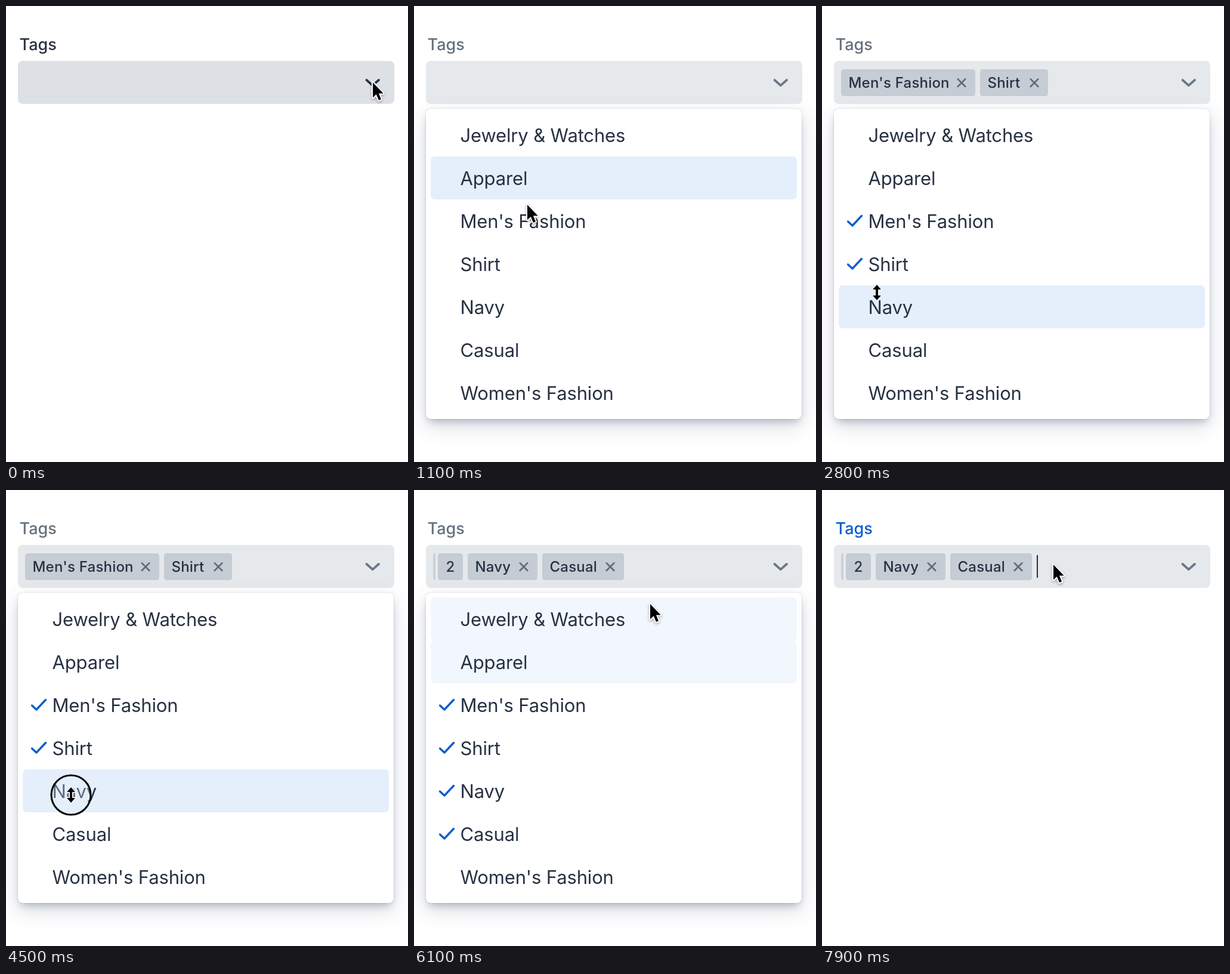
An HTML page for the animation above (8000 ms loop, 674 by 764 pixels).

```html
<!DOCTYPE html>
<html lang="en">
<head>
<meta charset="utf-8">
<title>Tag picker</title>
<style>
  html, body { margin: 0; width: 100%; height: 100%; overflow: hidden; background: #fff; }
  svg { position: absolute; left: 0; top: 0; display: block; }
  text { font-family: Inter, Roboto, sans-serif; fill: #273142; }
  #label { font-size: 27px; font-weight: 500; }
  .chip text { font-size: 24px; font-weight: 500; letter-spacing: .2px; }
  .chip rect, .chip .stub { fill: #c5ccd4; }
  .chip .close { fill: none; stroke: #5f6b7a; stroke-width: 2.7; stroke-linecap: round; }
  .option text { font-size: 31px; letter-spacing: -.15px; }
  .option rect { fill: #e4effb; }
  .option path { fill: none; stroke: #0b5cd0; stroke-width: 3.4; stroke-linecap: round; stroke-linejoin: round; }
  #menu {
    position: absolute; left: 20px; top: 172px; width: 630px; height: 520px;
    border-radius: 8px; background: #fff;
    box-shadow: 0 0 2px rgba(60, 80, 110, .35), 0 8px 14px -5px rgba(60, 80, 110, .36), 0 12px 34px rgba(60, 75, 100, .19);
  }
  #menu svg { left: -20px; top: -172px; }
  #arrow { filter: drop-shadow(0 2px 2px rgba(0, 0, 0, .3)); }
  #arrow, #resize { fill: #000; stroke: #fff; stroke-width: 4; paint-order: stroke; stroke-linejoin: round; }
  #resize { stroke-width: 3; }
</style>
</head>
<body>
<svg width="674" height="764">
  <text id="label" x="22.5" y="74">Tags</text>
  <rect id="field" x="20" y="92" width="631" height="72" rx="8"/>
  <g id="chips"></g>
  <path id="caret" d="M361 109V147" stroke="#273142" stroke-width="2"/>
  <path id="chevron" d="M604.5 124L614.7 133.2L625 124" fill="none" stroke-width="3.8" stroke-linecap="round" stroke-linejoin="round"/>
</svg>
<div id="menu"><svg id="options" width="674" height="764"></svg></div>
<svg width="674" height="764">
  <g id="cursor">
    <circle id="ring" r="33" fill="#e4effb" fill-opacity=".3" stroke="#000" stroke-width="3"/>
    <path id="arrow" d="M0 0V25.5L5.8 20L10 30L14 28.3L9.9 18.5H17.8Z"/>
    <path id="resize" d="M0-13L7-5H2V5H7L0 13L-7 5H-2V-5H-7Z"/>
  </g>
</svg>
<script>
const LOOP = 8000, STEP = 100;
const $ = id => document.getElementById(id);
const clamp = v => Math.max(0, Math.min(1, v));
const ramp = (t, start, length) => clamp((t - start) / length);

// name, time of selection, hover spans
const options = [
  ["Jewelry & Watches", Infinity, [[700, 800], [6050, 6250]]],
  ["Apparel", Infinity, [[850, 1150], [5950, 6050]]],
  ["Men's Fashion", 1600, [[1150, 1900], [5850, 5950]]],
  ["Shirt", 2300, [[1900, 2600], [5730, 5850]]],
  ["Navy", 4700, [[2600, 5000], [5600, 5730]]],
  ["Casual", 5300, [[5000, 5600]]],
  ["Women's Fashion", Infinity, []],
];
const chipWidths = { "Men's Fashion": 225, Shirt: 114, Navy: 117, Casual: 137 };

// time, x, y
const path = [
  [0, 615, 128], [500, 615, 128], [700, 530, 158], [900, 320, 260], [1100, 190, 333],
  [1300, 150, 362], [1700, 150, 362], [2000, 112, 428], [2400, 112, 428], [2800, 92, 480],
  [3800, 92, 480], [4000, 109, 511], [4800, 109, 511], [5000, 120, 568], [5400, 120, 568],
  [5600, 172, 518], [6100, 396, 191], [6400, 400, 130], [6700, 388, 125], [LOOP, 388, 125],
];
const clicks = [[200, 500], [1300, 1700], [2000, 2400], [4200, 4700], [5000, 5400], [6900, 7300]];

function pointAt(t) {
  const i = path.findIndex(p => p[0] > t);
  const [t0, x0, y0] = path[i - 1], [t1, x1, y1] = path[i];
  const k = (t - t0) / (t1 - t0);
  return [x0 + (x1 - x0) * k, y0 + (y1 - y0) * k];
}

$("options").innerHTML = options.map(([name], i) => `
  <g class="option" transform="translate(0 ${180 + 72 * i})">
    <rect x="28" width="614" height="72" rx="7"/>
    <path d="M43.5 181L51 188.5L66.5 172" transform="translate(0 -1)"/>
    <text x="77.5" y="48">${name.replace("&", "&amp;")}</text>
  </g>`).join("");
const rows = [...document.querySelectorAll(".option")].map(g => {
  const check = g.querySelector("path");
  check.setAttribute("d", "M43.5 181L51 188.5L66.5 172".replace(/181|188.5|172/g, n => n - 1 + 1));
  check.setAttribute("transform", "translate(0 -1)");
  return { light: g.querySelector("rect"), check };
});
for (const { check } of rows) {
  check.setAttribute("d", "M43.5 181.5L51 188.5L66.5 172");
  check.setAttribute("transform", "translate(0 -0.5) translate(0 -144)");
}

function chip(name, x) {
  const w = chipWidths[name], cx = w - 23;
  return `<g class="chip" transform="translate(${x} 106)">
    <rect width="${w}" height="45" rx="4.5"/><text x="12.5" y="31">${name}</text>
    <path class="close" d="M${cx - 6.3} 16.4l12.6 12.6m0 -12.6l-12.6 12.6"/></g>`;
}

function counter(n) {
  return `<g class="chip"><path class="stub" fill-opacity=".85" d="M36 106Q32 106 32 111V146Q32 151 36 151Z"/>
    <rect x="40" y="106" width="42" height="45" rx="4.5"/>
    <text x="61" y="137" text-anchor="middle">${n}</text></g>`;
}

// Only the last two tags stay open; earlier ones fold into a count.
function chipRow(names) {
  const folded = Math.max(0, names.length - 2);
  let x = folded ? 90 : 32, out = folded ? counter(folded) : "";
  for (const name of names.slice(folded)) {
    out += chip(name, x);
    x += chipWidths[name] + 8;
  }
  return out;
}

let shownCount = -1;
function render(t) {
  const chosen = options.filter(o => o[1] <= t).map(o => o[0]);
  if (chosen.length !== shownCount) {
    shownCount = chosen.length;
    $("chips").innerHTML = chipRow(chosen);
  }
  options.forEach(([, picked, hovers], i) => {
    const glow = hovers.map(([a, b]) => ramp(t, a, 100) * (1 - ramp(t, b, 100)));
    rows[i].light.style.opacity = Math.max(0, ...glow);
    rows[i].check.style.opacity = t >= picked ? 1 : 0;
  });

  const hovering = t < 500;
  $("field").style.fill = hovering ? "#dde0e5" : "#e6e9ec";
  $("chevron").style.stroke = hovering ? "#2b3444" : "#6b7784";
  $("label").style.fill = hovering ? "#273142" : t < 7100 ? "#64707d" : "#075bd2";
  $("caret").style.opacity = t >= 7500 ? 1 : 0;
  $("menu").style.opacity = ramp(t, 400, 200) * (1 - ramp(t, 7300, 300));

  const [x, y] = pointAt(t);
  $("cursor").setAttribute("transform", `translate(${x} ${y})`);
  const resizing = t >= 2500 && t < 5800;
  $("resize").style.opacity = resizing ? 1 : 0;
  $("arrow").style.opacity = resizing ? 0 : 1;

  const click = clicks.find(([a, b]) => t >= a && t < b);
  const grow = click ? ramp(t, click[0] - 100, 400) : 0;
  $("ring").style.opacity = grow;
  $("ring").setAttribute("r", 20 + 13 * grow);
}

const start = performance.now();
function tick() {
  const t = (performance.now() - start) % LOOP;
  render(Math.floor(t / STEP) * STEP);
  requestAnimationFrame(tick);
}
tick();
</script>
</body>
</html>
```
